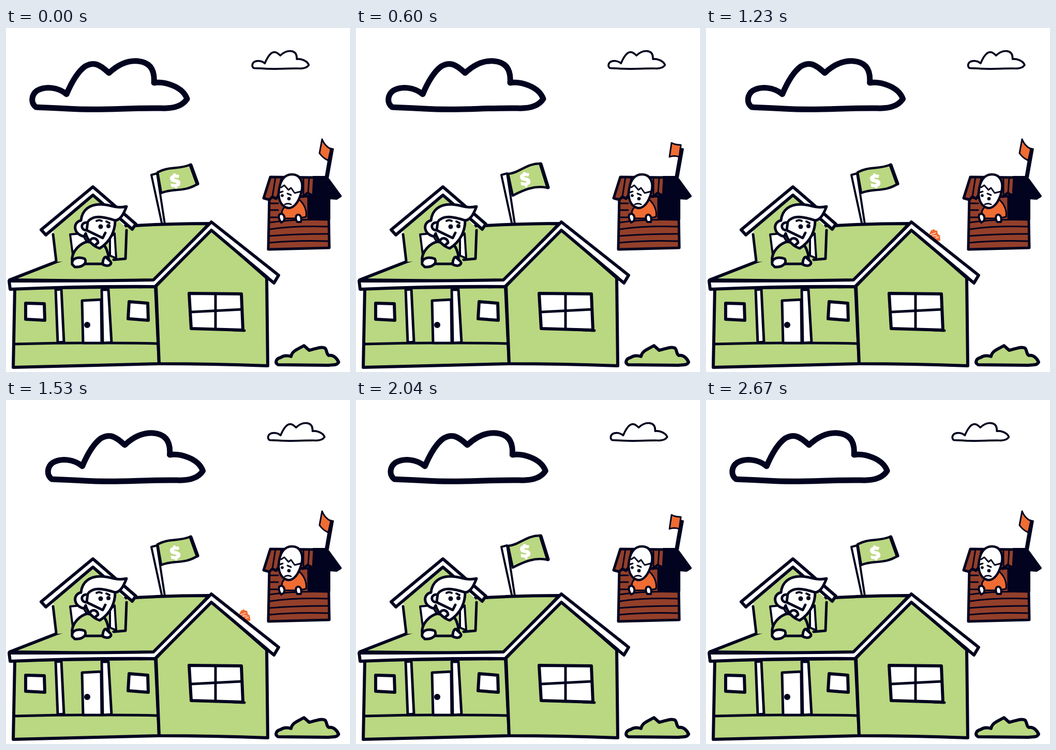
Animation of 665x665 px, one loop 2.7 s. Source, as an HTML page:

```html
<!DOCTYPE html>
<html lang="en">
<head>
<meta charset="utf-8">
<title>Two houses</title>
<style>
  html, body { margin: 0; height: 100%; overflow: hidden; background: #fff; }
  svg { display: block; width: 100vw; height: 100vh; }
  svg { fill: #fff; stroke: #01031f; stroke-width: 6; stroke-linejoin: round; stroke-linecap: round; }
  .green { fill: #bad781; }
  .brown { fill: #933f2a; }
  .orange { fill: #ef6c33; }
  .ink { fill: #01031f; }
  .line { fill: none; }
  .medium { stroke-width: 5; }
  .thin { stroke-width: 3; }
  .plain { stroke: none; }
  text { font: 800 35px "Open Sans", sans-serif; text-anchor: middle; stroke: #fff; stroke-width: 1; }
</style>
</head>
<body>
<svg viewBox="0 0 665 665">
  <defs>
    <path id="cloud" d="M58 153C47 145 49 129 60 121C76 112 100 114 117 128C125 109 138 85 153 74C169 65 180 69 199 87C214 73 232 62 255 64C276 66 288 78 286 106C305 103 341 112 350 137C341 151 322 156 300 155C230 154 190 160 120 156C90 154 72 154 58 153Z"/>
  </defs>

  <g id="clouds">
    <use href="#cloud" stroke-width="11"/>
    <use href="#cloud" stroke-width="10" transform="translate(457.6 20.9) scale(.365 .37)"/>
  </g>

  <g id="critter" class="orange plain">
    <path d="M-13 3L-8-4L-5-10L-1-11L0-13L2-10L7-9L8-3L12 0L13 10L0 12L-13 10Z"/>
    <path class="line" stroke="#fff" stroke-width="1.2" d="M-8-1L-2-3L4-5M-5 4L0 0L6 1M4 5L9 3"/>
  </g>

  <!-- large house -->
  <path id="flag" class="green" stroke-width="4.5"/>
  <path id="flagEdge" class="line" stroke-width="7"/>
  <text id="dollar">$</text>
  <path stroke-width="4" d="M281 284L292 281L307 379L302 381Z"/>

  <path class="green" d="M7 487L97 452L170 430L232 382L250 382Q320 378 393 378L286 490Z"/>
  <path class="green" d="M17 503L289 500L296 649L14 656Z"/>
  <path class="green" d="M397 389L504 483L506 653Q400 649 296 649L290 499Z"/>
  <path d="M6 489Q150 489 285 487L397 375L527 478L518 493L397 391L288 500Q150 499 8 505Z"/>
  <path class="line medium" d="M15 611Q150 607 292 610"/>
  <path class="medium" d="M96 506L107 505L112 607L100 608Z M185 506L198 506L204 608L187 609Z M147 527L184 525L185 609L149 609Z"/>
  <circle class="ink plain" cx="157" cy="574" r="6"/>
  <path d="M38 532L74 533L75 565L38 563Z M238 529L274 532L275 565L236 562Z M354 513L455 514L458 584L358 581Z"/>
  <path class="line medium" d="M405 516V579M358 549L455 544M440 584L461 585"/>

  <!-- dormer -->
  <path class="green plain" d="M168 322L91 389L97 452L231 447L231 385Z"/>
  <path class="line medium" d="M91 399L97 450M233 391L231 446L208 448"/>
  <path stroke-width="4" d="M124 399L147 397L160 420L129 438Z M201 405L210 397L213 445L201 440Z"/>
  <path d="M168 307L251 379L244 389L168 323L77 400L68 390Z"/>

  <!-- rich neighbour -->
  <path class="green medium" d="M128 452C125 431 145 416 157 413L190 420C197 430 198 440 199 452L183 456H152Z"/>
  <path class="medium" d="M151 403C130 399 128 376 145 372C147 351 163 340 184 341C202 341 212 350 233 345C228 358 222 371 211 372C211 389 204 412 181 426C169 422 158 412 154 397Z"/>
  <path class="line medium" d="M158 375C167 361 187 364 211 372M154 376C143 378 145 391 156 391L158 375"/>
  <path class="line medium" d="M158 392L187 406L192 396"/>
  <path class="medium" d="M162 413C164 403 177 405 178 415L171 421Z"/>
  <g class="ink plain"><circle cx="183" cy="384" r="4.5"/><circle cx="198" cy="383" r="4"/></g>
  <path class="line" stroke-width="4" d="M175 373Q180 370 185 373M194 374L200 377"/>
  <path class="medium" d="M128 457C126 446 138 441 152 446C158 455 147 463 133 462Z M187 457C187 447 190 442 194 443C196 449 203 448 203 455C201 460 194 461 187 457Z"/>

  <!-- shack -->
  <path class="ink" stroke-width="4" d="M594 288H620L647 325L639 330L625 329V369H582Z"/>
  <path class="ink plain" d="M626 231L634 233L624 289H616Z"/>
  <path id="smallFlag" class="orange" stroke-width="3"/>
  <path class="brown medium" d="M509 328L585 325V367L624 369L625 425L507 428Z"/>
  <path class="line thin" d="M511 339H526M511 352H526M511 366H528M510 376Q560 369 622 371M510 389Q560 382 622 384M510 402Q560 398 622 398M510 415Q560 410 622 412"/>
  <path class="brown medium" d="M511 288L596 289L594 325L583 319L574 326L530 319L522 330L515 326L509 332L498 329Z"/>
  <path class="line thin" d="M521 288L515 326M532 290L525 326M575 290V322M586 290L584 319"/>
  <path class="orange thin" d="M534 362C530 349 540 345 563 329C577 338 582 354 580 365L565 368H535Z"/>
  <path stroke-width="4.5" d="M527 319C529 295 538 283 553 283C569 283 576 299 571 317C566 337 556 349 545 348C533 345 527 334 527 319Z"/>
  <path class="line thin" d="M532 308L538 304L546 313L551 309L558 319L570 316M539 341Q545 338 551 341M529 318L535 316M544 320L551 323"/>
  <g class="ink plain"><circle cx="534" cy="324" r="2.8"/><circle cx="547" cy="330" r="3.3"/></g>
  <path stroke-width="4" d="M528 361C534 356 541 363 537 373L532 376Q526 368 528 361Z M561 363C566 357 573 364 570 375H563Q559 369 561 363Z"/>

  <path class="green" d="M526 651C519 647 522 639 531 637C538 632 545 633 551 635C553 624 564 621 576 614L586 623C600 620 609 615 617 619C621 624 619 630 624 633C633 631 640 639 643 646C640 652 635 651 623 652Z"/>
</svg>
<script>
const LOOP = 2700;
const $ = id => document.getElementById(id);

// Each pose: green flag body, its heavy right edge, dollar baseline, small flag.
const poses = [
  ["M293 279C315 267 333 274 357 264L371 301C345 318 325 309 300 319Z", "M357 265L370 301", 308,
   "M611 215Q616 228 628 234L623 256Q613 252 606 242Z"],
  ["M294 282C315 281 330 261 357 262L371 309C345 303 322 314 303 324Z", "M357 263L371 308", 305,
   "M610 222Q617 226 628 226L625 249Q615 246 606 249Z"],
  ["M293 279C315 281 334 268 355 260L370 302C348 309 330 324 302 321Z", "M355 261L370 302", 309,
   "M610 219Q615 229 627 229L623 254Q613 254 606 247Z"]
];

// Time, x, y of the creature behind the roof.
const route = [[0, 215, 420], [560, 312, 389], [930, 376, 389], [1230, 440, 401],
  [1430, 464, 420], [1650, 454, 413], [1800, 405, 420], [LOOP, 405, 420]];

function along(points, t) {
  const i = points.findIndex(p => p[0] > t);
  const a = points[i - 1], b = points[i], k = (t - a[0]) / (b[0] - a[0]);
  return [1, 2].map(n => a[n] + (b[n] - a[n]) * k);
}

function draw(now) {
  const t = now % LOOP;
  const drift = 15.75 * (1 - Math.cos(2 * Math.PI * (t - 30) / LOOP));
  $("clouds").setAttribute("transform", `translate(${drift})`);
  $("critter").setAttribute("transform", `translate(${along(route, t)})`);

  const [body, edge, baseline, small] = poses[Math.floor((t / 1350 + .15) % 1 * 3)];
  $("flag").setAttribute("d", body);
  $("flagEdge").setAttribute("d", edge);
  $("dollar").setAttribute("transform", `translate(329 ${baseline}) rotate(-8)`);
  $("smallFlag").setAttribute("d", small);
}

const start = performance.now();
function tick() {
  draw(performance.now() - start);
  requestAnimationFrame(tick);
}
tick();
</script>
</body>
</html>
```
